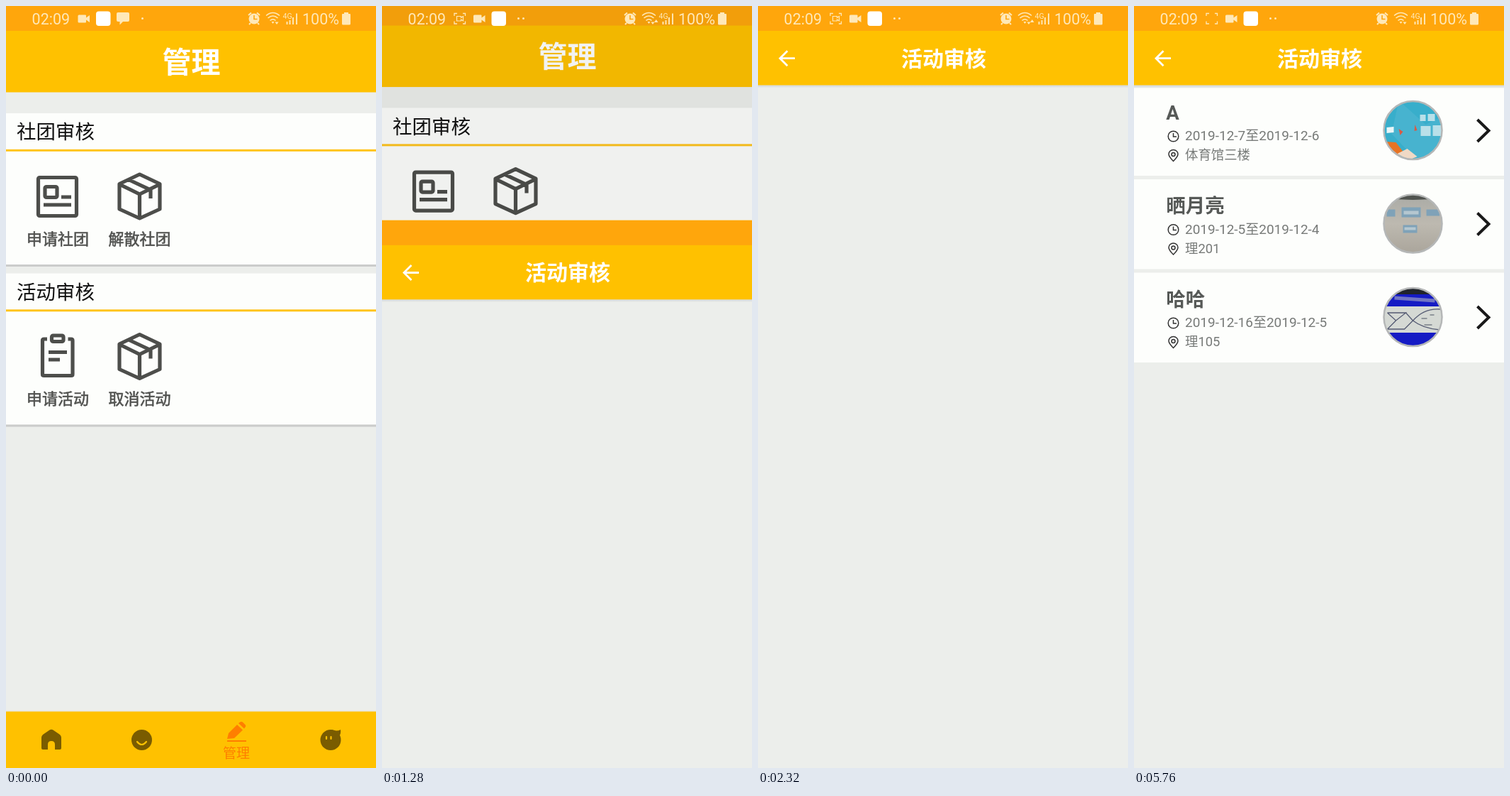
Write an HTML page that moves like this. It is 522x1073 px and loops after 6.16 s.

```html
<!DOCTYPE html>
<html lang="zh-CN">
<head>
<meta charset="utf-8">
<title>活动审核</title>
<style>
html, body { margin: 0; width: 100%; height: 100%; overflow: hidden; background: #eceeeb; }
svg { display: block; width: 522px; height: 1073px; }
text { font-family: Roboto, "Noto Sans CJK SC", "Noto Sans CJK", sans-serif; }
.line { fill: none; stroke: #4d4e4b; stroke-width: 5.200; stroke-linejoin: round; }
.mid { text-anchor: middle; }
.label { fill: #50514f; stroke: #50514f; stroke-width: .6; }
.thin { fill: none; stroke: #333; stroke-width: 1.5; }
</style>
</head>
<body>
<svg viewBox="0 0 522 1073">
  <defs>
    <clipPath id="round"><circle r="41"/></clipPath>
    <linearGradient id="shade" x2="0" y2="1">
      <stop stop-color="#d2d6d8"/><stop offset="1" stop-color="#eceeeb"/>
    </linearGradient>
    <linearGradient id="wall" x2="0" y2="1">
      <stop stop-color="#a9aaa5"/><stop offset=".5" stop-color="#bdb9b0"/><stop offset="1" stop-color="#aaa59b"/>
    </linearGradient>
    <g id="box" class="line">
      <path d="M188.500 237L217 250.500V286L188.500 299L160 286V250.500ZM160 251L188.500 265L217 251M188.500 265V299M173 244.500L204 259V271"/>
    </g>
  </defs>

  <g id="home">
    <rect width="522" height="1073" fill="#eceeeb"/>
    <rect width="522" height="121.500" fill="#ffc100"/>
    <rect width="522" height="35" fill="#ffa60c"/>
    <text class="mid" x="261.500" y="93.700" font-size="41" font-weight="700" fill="#fff">管理</text>
    <g id="sections"></g>
    <g class="line">
      <rect x="45.500" y="241.500" width="54" height="54" rx="2"/>
      <rect x="55" y="254.500" width="17" height="15" rx="2"/>
      <path d="M78 269H92M53 280H92"/>
    </g>
    <use href="#box"/>
    <use href="#box" y="225.500"/>
    <g class="line">
      <rect x="64.500" y="464" width="16.500" height="8.500" rx="2"/>
      <path d="M58 469H53.500Q51.500 469 51.500 471V518.500Q51.500 520.500 53.500 520.500H92Q94 520.500 94 518.500V471Q94 469 92 469H87.500M60 487.500H86M60 498H76"/>
    </g>
    <circle id="touch" cx="63" cy="513" r="16" fill="#dcdcec" fill-opacity=".55" stroke="#c9c9e2" stroke-width="1.500"/>

    <rect y="992.500" width="522" height="1" fill="#e3e2da"/>
    <rect y="993.500" width="522" height="80" fill="#ffc100"/>
    <g fill="#7a5c00">
      <path d="M50 1030Q50 1028 52 1026L61.500 1019.500Q64 1018 66.500 1019.500L76 1026Q78 1028 78 1030V1045Q78 1047 76 1047H69V1040Q69 1035 64 1035T59 1040V1047H52Q50 1047 50 1045Z"/>
      <circle cx="191.500" cy="1033.500" r="14.500"/>
      <circle cx="458" cy="1033.500" r="14.500"/>
      <path d="M459 1019Q467 1022 472 1019Q473 1026 469 1029Z"/>
    </g>
    <g fill="none" stroke="#ffc100" stroke-width="2.200" stroke-linecap="round">
      <path d="M185 1036Q191.500 1044 198 1036"/>
      <path d="M452 1029V1032M458.500 1029V1032"/>
    </g>
    <g fill="#ff7e00">
      <path d="M312 1032L314 1024L326 1012L334 1019.500L322 1031ZM328 1010L330 1008.500Q332 1007 334 1008.500L337.500 1012Q339 1014 337.500 1015.500L336 1017.500Z"/>
      <rect x="312" y="1034" width="27" height="2"/>
      <text class="mid" x="325" y="1059" font-size="19">管理</text>
    </g>
  </g>
  <rect id="scrim" width="522" height="1073"/>

  <g id="sheet">
    <rect width="522" height="1073" fill="#eceeeb"/>
    <g id="list"></g>
    <rect y="111.500" width="522" height="4" fill="url(#shade)"/>
    <rect width="522" height="111.500" fill="#ffc100"/>
    <rect width="522" height="35" fill="#ffa60c"/>
    <path d="M52 73.700H32M41.500 63.200L31 73.700L41.500 84.200" fill="none" stroke="#fff" stroke-width="2.800"/>
    <text class="mid" x="262" y="84.700" font-size="30" font-weight="700" fill="#fff">活动审核</text>
  </g>

  <g id="status" fill="#ffe8b8">
    <text x="36.600" y="25.500" font-size="21.500">02:09</text>
    <g id="recorder">
      <path d="M102 14V10.500H106M114 10.500H117.500V14M117.500 21.500V25H114M106 25H102V21.500" fill="none" stroke="#ffe8b8" stroke-width="1.300"/>
      <path id="lens" d="M105.500 14.500H111.500V16.500L114.500 14.500V21L111.500 19V21H105.500Z" fill="none" stroke="#ffe8b8" stroke-width="1.200"/>
    </g>
    <g id="tray">
      <path d="M103 12.500H112Q113 12.500 113 13.500V16.500L118 13V23L113 19.500V22.500Q113 23.500 112 23.500H103Q101.500 23.500 101.500 22V14Q101.500 12.500 103 12.500Z"/>
      <rect x="127" y="7.500" width="20.500" height="20.500" rx="4" fill="#fff"/>
    </g>
    <path id="chat" d="M158 9H172Q174 9 174 11V20Q174 22 172 22H165L160.500 26.500V22H158Q156 22 156 20V11Q156 9 158 9Z"/>
    <circle cx="192.500" cy="17.500" r="1.500"/>
    <circle id="dot" cx="199.500" cy="17.500" r="1.500"/>

    <circle cx="350" cy="18" r="7.500"/>
    <path d="M342 13L346 9.500M358 13L354 9.500M345 24L343 26M355 24L357 26" stroke="#ffe8b8" stroke-width="2"/>
    <path d="M350 13V18.500H354.500" fill="none" stroke="#ffa60c" stroke-width="1.600"/>
    <path d="M367 13.500Q376.500 5.500 386 13.500M369.500 17Q376.500 11 383.500 17M372.500 20.500Q376.500 17 380.500 20.500" fill="none" stroke="#ffe8b8" stroke-width="1.600"/>
    <path d="M374.500 22H378.500L376.500 25ZM379.500 22.500H384.500L382 26Z"/>
    <path id="uplink" d="M384 23L386.800 19L389.500 23Z"/>
    <text x="390.500" y="17.500" font-size="10.500">4G</text>
    <path d="M396.500 22V26M400.500 20V26M405 16V26M410 10.500V26" stroke="#ffe8b8" stroke-width="1.900"/>
    <text x="418" y="25.500" font-size="21.500">100%</text>
    <path d="M477 9H483V11H485Q486 11 486 12V25Q486 26.500 484.500 26.500H475.500Q474 26.500 474 25V12Q474 11 475 11H477Z"/>
  </g>
</svg>
<script>
const LOOP = 6160, STEP = 80;
const $ = id => document.getElementById(id);
const clamp = v => Math.max(0, Math.min(1, v));
const ramp = (t, from, to) => clamp((t - from) / (to - from));
const easeOut = p => 1 - (1 - p) ** 2;

const section = (y, title, first, second) => `
  <g transform="translate(0 ${y})">
    <rect width="522" height="213" fill="#fdfefc"/>
    <text x="15" y="36" font-size="27.500" fill="#111">${title}</text>
    <rect y="50.800" width="522" height="3" fill="#ffc41c"/>
    <rect y="213" width="522" height="3" fill="#cbcccb"/>
    <g class="mid label" font-size="22">
      <text x="73" y="184.800">${first}</text><text x="188.500" y="184.800">${second}</text>
    </g>
  </g>`;

const photos = [
  `<rect x="-42" y="-42" width="84" height="84" fill="#38aecb"/>
   <path d="M-20 -42L18 -8L42 -20V42H5L-30 5Z" fill="#47b3cf"/>
   <path d="M10 -22H18V-13H10ZM21 -23H31V-13H21ZM11 -6H25V8H11ZM28 -7H42V8H28Z" fill="#b9e0e9"/>
   <path d="M-37 -4L-27 -5V3L-37 4Z" fill="#e8f6f8"/>
   <path d="M-38 16L-24 17L-14 30L-27 42H-42Z" fill="#e77424"/>
   <path d="M-22 33L-8 26L6 37L-6 42Z" fill="#f0d9c5"/>
   <path d="M-20 -2L-14 2L-18 7ZM3 -8L6 0L2 1Z" fill="#d85a45"/>`,
  `<rect x="-42" y="-42" width="84" height="84" fill="url(#wall)"/>
   <path d="M-42 -42H42V-36Q0 -31 -42 -36Z" fill="#50534f"/>
   <path d="M-16 -23H11V-9H-16ZM-37 -20H-25V-10H-37ZM19 -20H38V-11H19ZM-14 2H6V13H-14Z" fill="#7fa2b8"/>
   <path d="M-13 -18H8V-13H-13ZM-12 5H4V9H-12Z" fill="#b5c7d0"/>`,
  `<rect x="-42" y="-42" width="84" height="84" fill="#151bc4"/>
   <rect x="-42" y="-42" width="84" height="10" fill="#20242b"/>
   <rect x="-42" y="-15" width="84" height="37" fill="#d5d9d4"/>
   <path d="M-26 -27L31 -23" stroke="#7175c4" stroke-width="5"/>
   <path d="M-36 -6H-10L-24 5L-36 -6M-36 17L-24 5M-36 17H-12L0 5L-10 -6M0 5Q16 -13 39 -11M0 5Q14 16 38 18" fill="none" stroke="#555b73" stroke-width="1.300"/>
   <path d="M12 2H20M24 -3H30M16 11H27" stroke="#8f959a" stroke-width="2"/>`
];

const row = ([title, dates, place], i) => `
  <g transform="translate(0 ${i * 131.5})">
    <rect y="112.500" width="522" height="126.500" fill="#fdfefc"/>
    <text x="45.300" y="159.700" font-size="27.500" font-weight="700" fill="#565957">${title}</text>
    <g fill="#777a78">
      <text x="72" y="189" font-size="19">${dates}</text>
      <text x="72" y="216" font-size="18.400">${place}</text>
    </g>
    <g class="thin">
      <circle cx="55.500" cy="183.500" r="7.300"/><path d="M55.500 179V184H60"/>
      <path d="M55.500 218.500Q49 212 49 208.500A6.500 6 0 0 1 62 208.500Q62 212 55.500 218.500Z"/>
      <circle cx="55.500" cy="209" r="2.500"/>
    </g>
    <g transform="translate(393.500 175)">
      <g clip-path="url(#round)">${photos[i]}</g>
      <circle r="41" fill="none" stroke="#b5b7b7" stroke-width="2.500"/>
    </g>
    <path d="M484.500 160L500.500 175.500L484.500 191" fill="none" stroke="#191919" stroke-width="4"/>
  </g>`;

$('sections').innerHTML =
  section(151, '社团审核', '申请社团', '解散社团') +
  section(376.5, '活动审核', '申请活动', '取消活动');

$('list').innerHTML = [
  ['A', '2019-12-7至2019-12-6', '体育馆三楼'],
  ['晒月亮', '2019-12-5至2019-12-4', '理201'],
  ['哈哈', '2019-12-16至2019-12-5', '理105']
].map(row).join('');

const show = (id, opacity) => $(id).setAttribute('opacity', +opacity);
const move = (id, x, y) => $(id).setAttribute('transform', `translate(${x} ${y})`);

function render(ms) {
  const t = Math.floor(ms / STEP) * STEP;

  // A new notification pushes the status icons to the right.
  const shift = easeOut(ramp(t, 0, 480));
  move('tray', 27.5 * shift, 0);
  move('chat', 27.5 * shift, 0);
  show('chat', 1 - ramp(t, 0, 320));
  show('dot', ramp(t, 160, 480));
  show('recorder', ramp(t, 80, 480));
  show('lens', !(t >= 3920 && t < 4160 || t >= 5760));
  show('uplink', t >= 1280 && t < 4480);

  show('touch', ramp(t, 880, 1040) * (1 - ramp(t, 1200, 1280)));

  // The next page decelerates into place over the dimmed first page.
  const entry = ramp(t, 1200, 1520);
  const offset = t < 1280 ? 1073 : t < 1600 ? 57 * Math.exp((1360 - t) / 48) : 0;
  move('home', 0, -17 * easeOut(entry));
  show('scrim', 0.2 * entry);
  move('sheet', 0, offset);
  show('sheet', t >= 1280);
  show('list', t >= 4480);
}

function tick() {
  render(performance.now() % LOOP);
  requestAnimationFrame(tick);
}
tick();
</script>
</body>
</html>
```
